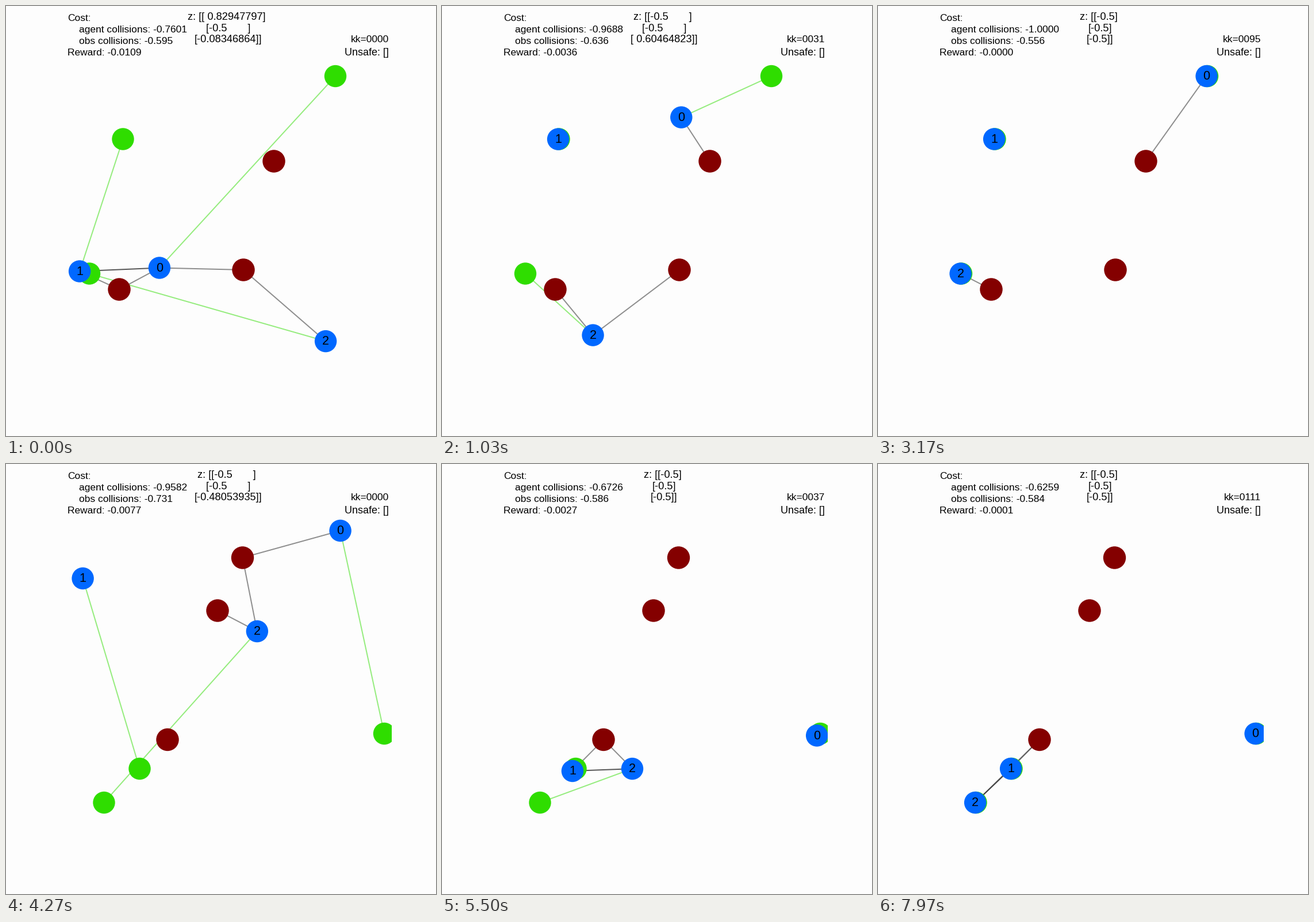
A matplotlib script that plays this animation: 748x748 px, repeating every 8 s.

```python
import numpy as np
import matplotlib.pyplot as plt
from matplotlib.animation import FuncAnimation
from matplotlib.collections import LineCollection
from matplotlib.patches import Circle, Rectangle

SIZE, DPI = 748, 64
PT = 72 / DPI
FRAMES, INTERVAL = 400, 20
STEP_MS = 100 / 3
SENSE = 192  # neighbours closer than this are linked
REST = np.array([-1.4, 0])  # where an agent settles, relative to its goal
FONT = "Liberation Sans"


def pulse(size, center, width, power=2):
    """A bell-shaped term that fades away from its centre."""
    size = np.array(size, float)
    return lambda k: size * np.exp(-(abs(k - center) / width) ** power)


def total(k, base, pulses):
    return base + sum(p(k) for p in pulses)


# Each agent path and read-out is a resting value plus fading pulses.
SCENES = [
    dict(
        start=0,
        goals=[(573, 122), (203.5, 231.5), (145, 465.5)],
        obstacles=[(466, 270), (413, 459), (197, 493)],
        paths=[
            [pulse((-304, 333.5), 0, 25), pulse((-90, 0), 31, 14)],
            [pulse((-74, 230), 0, 14, 2.5)],
            [pulse((412.5, 103), 0, 27.8), pulse((0, 77.4), 31, 24)],
        ],
        z=[[pulse(1.32947797, 0, 14, 4)], [],
           [pulse(1.10464823, 31, 31.12938, 6)]],
        agent_cost=(1, [pulse(-0.2399, 0, 21.7)]),
        obs_cost=(0.556, [pulse(0.0823, 26, 30)]),
        reward=(0, [pulse(0.0109, 0, 29.45)]),
    ),
    dict(
        start=128,
        goals=[(658, 469), (232.5, 530), (170.5, 589)],
        obstacles=[(411.5, 163), (368, 255), (281, 479.5)],
        paths=[
            [pulse((-75, -353), 0, 20, 3), pulse((32, 0), 25, 7), pulse((-6, 4), 37, 7)],
            [pulse((-97.5, -331), 0, 20, 3), pulse((-4, 4.6), 37, 7)],
            [pulse((209, 0), 0, 44, 8), pulse((0, -223), 0, 34.6, 4),
             pulse((60, -75), 0, 8), pulse((-32, 0), 18, 10), pulse((0, 40), 48, 6)],
        ],
        z=[[], [], [pulse(3.07449, 15, 10, 4)]],
        agent_cost=(0.6259, [pulse(0.3323, 0, 28.26, 2.5)]),
        obs_cost=(0.584, [pulse(0.147, 0, 25.7, 4)]),
        reward=(0.0001, [pulse(0.0076, 0, 36.3, 4)]),
    ),
]

fig = plt.figure(figsize=(SIZE / DPI, SIZE / DPI), dpi=DPI, facecolor="#fdfdfd")
ax = fig.add_axes([0, 0, 1, 1])
ax.set(xlim=(0, SIZE), ylim=(SIZE, 0))
ax.axis("off")
field = Rectangle((108, 90), 563.5, 564, fc="none", ec="none")
ax.add_patch(field)


def dots(color, radius, z):
    made = [Circle((0, 0), radius, fc=color, lw=0, zorder=z) for _ in range(3)]
    for dot in made:
        ax.add_patch(dot)
        dot.set_clip_path(field)
    return made


def links(color, alpha):
    made = LineCollection([], colors=color, alpha=alpha, linewidths=2 * PT, zorder=1)
    ax.add_collection(made)
    made.set_clip_path(field)
    return made


def label(x, y, text="", size=17.4, ha="left"):
    return ax.text(x, y, text, fontsize=size * PT, family=FONT, ha=ha,
                   va="baseline", color="black", zorder=6)


goal_links = links("#2fdd00", 0.5)
obs_links = links("#202020", 0.5)
agent_links = links("#202020", 0.75)
goal_dots = dots("#2fdd00", 19.2, 2)
obs_dots = dots("#840000", 19.7, 3)
agent_dots = dots("#0068ff", 19.2, 4)
names = [label(0, 0, str(i), 21.5, "center") for i in range(3)]

label(107, 26, "Cost:")
agent_text = label(127, 46)
obs_text = label(127, 66)
reward_text = label(107, 85.5)
z_text = [label(x, y, size=18.2, ha="center")
          for x, y in ((384, 24), (386.5, 43.5), (386.5, 63))]
step_text = label(666, 63, ha="right")
label(666, 86, "Unsafe: []", size=18, ha="right")


def near(a, b):
    return np.hypot(a[0] - b[0], a[1] - b[1]) < SENSE


def draw(frame):
    step = round(frame * INTERVAL / STEP_MS)
    scene = SCENES[step >= SCENES[1]["start"]]
    k = step - scene["start"]
    goals, obstacles = scene["goals"], scene["obstacles"]
    agents = [total(k, goal + REST, path) for goal, path in zip(goals, scene["paths"])]

    for group, places in ((goal_dots, goals), (obs_dots, obstacles), (agent_dots, agents)):
        for dot, place in zip(group, places):
            dot.center = place
    for name, (x, y) in zip(names, agents):
        name.set_position((x, y + 6.2))

    goal_links.set_segments(list(zip(agents, goals)))
    obs_links.set_segments([(a, o) for a in agents for o in obstacles if near(a, o)])
    agent_links.set_segments([(agents[i], agents[j]) for i, j in ((0, 1), (0, 2), (1, 2))
                              if near(agents[i], agents[j])])

    agent_text.set_text(f"agent collisions: -{total(k, *scene['agent_cost']):.4f}")
    obs_text.set_text(f"obs collisions: -{total(k, *scene['obs_cost']):.3f}")
    reward_text.set_text(f"Reward: -{total(k, *scene['reward']):.4f}")
    z = np.array([[total(k, -0.5, pulses)] for pulses in scene["z"]]).round(8)
    for text, row in zip(z_text, f"z: {z}".split("\n")):
        text.set_text(row.strip())
    step_text.set_text(f"kk={k:04d}")
    return []


anim = FuncAnimation(fig, draw, frames=FRAMES, interval=INTERVAL,
                     init_func=lambda: draw(0), repeat=True, repeat_delay=0, blit=False)
plt.show()
```
